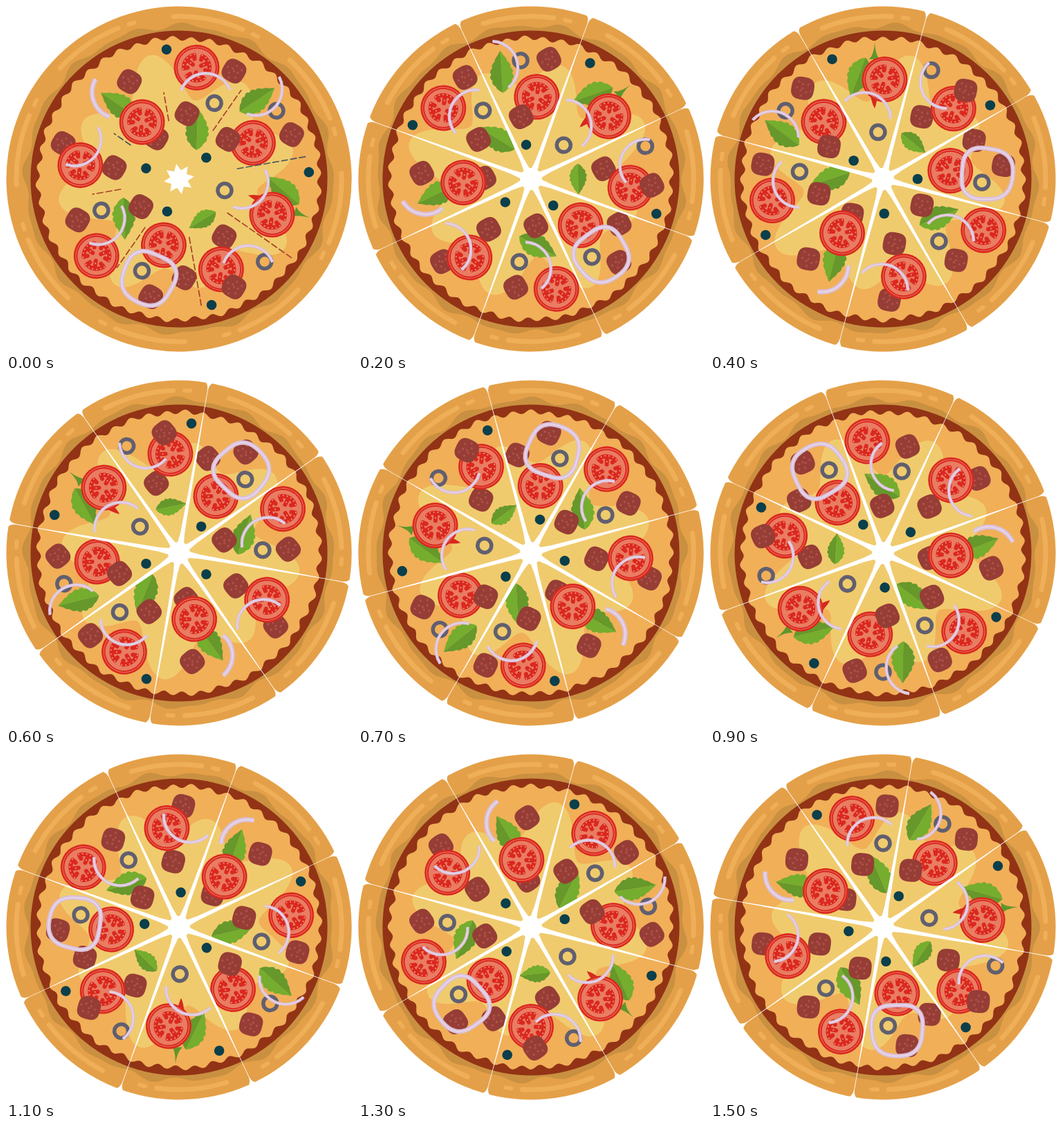
Write an HTML page with a canvas that moves like this. It is 500 px wide and 500 px high and loops after 1.6 s.

```html
<!DOCTYPE html>
<html lang="en">
<head>
<meta charset="utf-8">
<title>Spinning pizza</title>
<style>
html, body { margin: 0; width: 100%; height: 100%; overflow: hidden; background: #fff; }
canvas { display: block; width: 500px; height: 500px; }
</style>
</head>
<body>
<canvas id="stage" width="500" height="500"></canvas>
<script>
const ctx = document.getElementById('stage').getContext('2d');
const TAU = Math.PI * 2, RAD = Math.PI / 180;
const STEP = 100, LOOP = 1600, SLICES = 8, SLICE = 360 / SLICES, FIRST_CUT = 15;

// All drawing uses the pizza's centre as the origin.
const polar = (r, a) => [r * Math.cos(a), r * Math.sin(a)];

// Places one topping at each angle (degrees) on a ring.
function ring(draw, r, ...angles) {
  angles.forEach(a => draw(...polar(r, a * RAD)));
}

function at(x, y, angle, draw) {
  ctx.save();
  ctx.translate(x, y);
  ctx.rotate(angle * RAD);
  draw();
  ctx.restore();
}

function fill(color) {
  ctx.fillStyle = color;
  ctx.fill();
}

function stroke(color, width, cap = 'butt') {
  ctx.strokeStyle = color;
  ctx.lineWidth = width;
  ctx.lineCap = cap;
  ctx.stroke();
}

function disc(x, y, r, color) {
  ctx.beginPath();
  ctx.arc(x, y, r, 0, TAU);
  fill(color);
}

// Closed outline whose radius depends on the angle.
function outline(radius, x = 0, y = 0) {
  ctx.beginPath();
  const n = 720;
  for (let i = 0; i < n; i++) {
    const a = i / n * TAU, r = radius(a);
    ctx.lineTo(x + r * Math.cos(a), y + r * Math.sin(a));
  }
  ctx.closePath();
}

function crustArc(r, from, to, width) {
  ctx.beginPath();
  ctx.arc(0, 0, r, from * RAD, to * RAD);
  stroke('#efae58', width, 'round');
}

function base() {
  disc(0, 0, 249.5, '#e4a048');
  for (let i = 0; i < SLICES; i++) {
    const a = FIRST_CUT + i * SLICE;
    crustArc(235, a + 8, a + 33, 7);
    crustArc(235, a + 37, a + 39, 6);
  }
  outline(a => 222 + 3 * Math.sin(16 * a) + 2 * Math.sin(25 * a + 1));
  fill('#ca9041');
  disc(0, 0, 214.5, '#923315');
  outline(a => 203.5 + 3 * Math.cos(48 * a) + Math.sin(17 * a));
  fill('#f1af58');
  outline(a => 148 + 24 * Math.cos(8 * (a - 1)) + 12 * Math.cos(5 * a));
  fill('#f0cb6d');
}

function leaf(x, y, angle, len = 61) {
  const half = (side, color) => {
    ctx.beginPath();
    ctx.moveTo(0, 0);
    for (let u = 0.05; u < 1; u += 0.05) {
      const tooth = 1 - 0.12 * (Math.round(u * 20) % 3 === 0);
      ctx.lineTo(len * u, side * len * 0.28 * tooth * Math.sin(Math.PI * u ** 0.8));
    }
    ctx.lineTo(len, 0);
    fill(color);
  };
  at(x, y, angle, () => {
    ctx.translate(-len / 2, 0);
    half(1, '#75ad2e');
    half(-1, '#66982b');
  });
}

function chilli() {
  ctx.beginPath();
  ctx.moveTo(-20, -150);
  ctx.quadraticCurveTo(-20, -115, -12, -102);
  ctx.quadraticCurveTo(-6, -118, -6, -150);
  fill('#d62a1f');
  ctx.beginPath();
  ctx.moveTo(-20, -173);
  ctx.quadraticCurveTo(-13, -180, -12, -197);
  ctx.quadraticCurveTo(-11, -180, -5, -173);
  fill('#5f962b');
}

function tomato(x, y) {
  disc(x, y, 33, '#db281f');
  disc(x, y, 30.3, '#ea7d63');
  disc(x, y, 29.4, '#db281f');
  disc(x, y, 27.4, '#e97c62');
  at(x, y, -12, () => {
    ctx.lineJoin = 'round';
    for (let i = 0; i < 3; i++) {
      ctx.rotate(TAU / 3);
      ctx.beginPath();
      ctx.moveTo(...polar(13, -0.66));
      ctx.arc(0, 0, 18.5, -0.72, 0.72);
      ctx.lineTo(...polar(13, 0.66));
      ctx.moveTo(18, 0);
      ctx.lineTo(7, 0);
      stroke('#db281f', 6, 'round');
      for (let a = -0.75; a <= 0.75; a += 0.3) disc(...polar(19.5, a), 1, '#f2a083');
      disc(11, 0, 1, '#f2a083');
    }
  });
}

function meat(x, y) {
  outline(a => 17.3 + 0.9 * Math.cos(4 * a + 2.4), x, y);
  fill('#963d36');
  for (let i = 0; i < 9; i++) {
    const [dx, dy] = polar(4.3 * Math.sqrt(i), i * 2.4);
    disc(x + dx, y + dy, 1.7, '#ad524a');
  }
}

function olive(x, y) {
  ctx.beginPath();
  ctx.arc(x, y, 10, 0, TAU);
  stroke('#605f70', 5.5);
}

function dot(x, y) {
  disc(x, y, 7.3, '#0b3f4b');
}

function onionStroke(width) {
  stroke('#d9bfd9', width);
  stroke('#e6d3e6', width * 0.4);
}

// An arc centred on its chord, bulging towards the given angle.
function onion(x, y, bulge, width = 4.5, spread = 69) {
  at(x, y, bulge, () => {
    ctx.beginPath();
    ctx.arc(-14, 0, 38, -spread * RAD, spread * RAD);
    onionStroke(width);
  });
}

function toppings() {
  leaf(-36, -147, 111);
  leaf(-146, -67, 216);
  leaf(-77, 0, 162);
  leaf(44, -52, 39, 45);
  leaf(81, 55, -22);
  leaf(-71, 119, 104);
  chilli();

  ring(meat, 68, 34, 131);
  ring(meat, 95, 80, 167);
  ring(meat, 106, 302);
  ring(meat, 143, 337);
  ring(meat, 158, 48, 133);
  ring(meat, 175, 87, 187, 228.5, 353.5);

  ring(tomato, 98, -7, 127);
  ring(tomato, 119, 224);
  ring(tomato, 144, -89, -45, 78);
  ring(tomato, 163, 27, 169);

  ring(meat, 91, 211);
  ring(meat, 175, 313);

  ring(olive, 68, 264);
  ring(olive, 121, 48, 185);
  ring(olive, 143, 2);
  ring(olive, 172, 215, 294);

  ring(dot, 50, 0, 88, 212);
  ring(dot, 188, 154.5, 247, 325.5);

  const up = -69, left = 159;
  onion(-22, -100, up);
  onion(-155, -73, up);
  onion(3, 148, up);
  onion(98, 77, up);
  onion(79, -135, left);
  onion(-134, 8, left);
  onion(-79, 136, 50, 7, 50);

  outline(a => 38.5 + 1.8 * Math.cos(4 * a + 2.8) + Math.cos(3 * a), 150, -7.5);
  onionStroke(6.5);
}

function cuts() {
  for (let i = 0; i < SLICES; i++) {
    at(0, 0, FIRST_CUT + i * SLICE, () => {
      ctx.beginPath();
      ctx.moveTo(10, -5);
      ctx.lineTo(30, -3);
      ctx.lineTo(210, -0.4);
      ctx.lineTo(239, -0.4);
      ctx.quadraticCurveTo(248, -0.8, 251, -7);
      ctx.lineTo(251, 7);
      ctx.quadraticCurveTo(248, 0.8, 239, 0.4);
      ctx.lineTo(210, 0.4);
      ctx.lineTo(30, 3);
      ctx.lineTo(10, 5);
      fill('#fff');
    });
  }
  disc(0, 0, 16, '#fff');
}

// Faint traces where the uncut slices meet, and a star-shaped hole.
function seams() {
  for (let i = 0; i < SLICES; i++) {
    at(0, 0, FIRST_CUT - 3 * SLICE + i * SLICE, () => {
      const length = 30 + 42 * (1 + Math.cos((i - 1) * TAU / SLICES));
      ctx.beginPath();
      ctx.moveTo(85, 0);
      ctx.lineTo(85 + length, 0);
      ctx.setLineDash([10, 3]);
      stroke(i % 5 ? '#a8402c' : '#4c5660', 1.7);
      ctx.setLineDash([]);
    });
  }
  ctx.beginPath();
  for (let i = 0; i < SLICES * 2; i++) {
    ctx.lineTo(...polar(i % 2 ? 13 : 22, (FIRST_CUT + i * SLICE / 2) * RAD));
  }
  fill('#fff');
}

// 25 degrees back per step after an uncut start, with one held step.
function turn(step) {
  if (step === 0) return 110;
  return 25 * (4 - (step === 3 ? 2 : step));
}

function draw(step) {
  ctx.fillStyle = '#fff';
  ctx.fillRect(0, 0, 500, 500);
  at(250, 250, turn(step), () => {
    base();
    toppings();
    if (step === 0) seams();
    else cuts();
  });
}

const start = performance.now();
let shown = -1;
function frame() {
  const step = Math.floor((performance.now() - start) % LOOP / STEP);
  if (step !== shown) draw(shown = step);
  requestAnimationFrame(frame);
}
frame();
</script>
</body>
</html>
```
